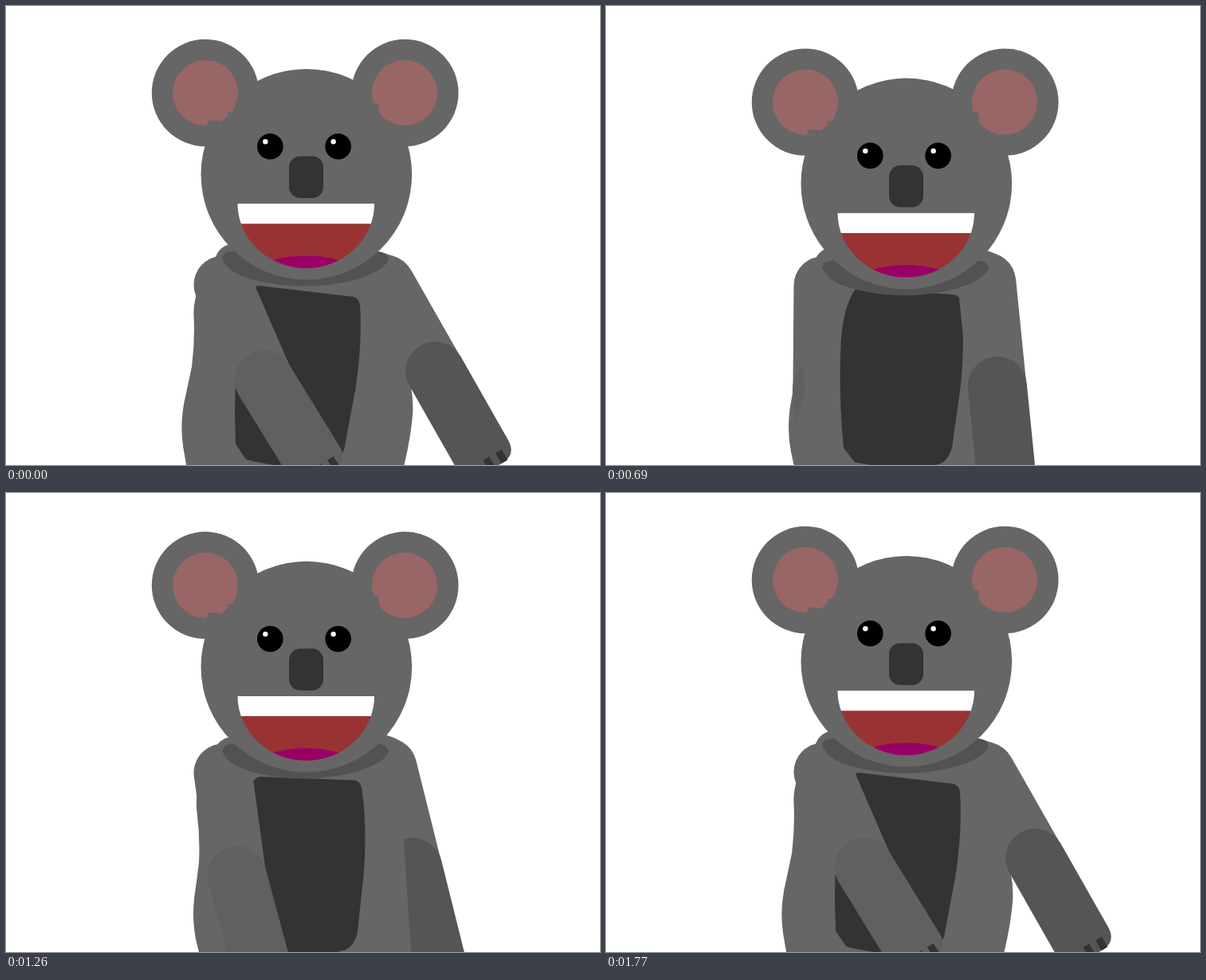
Animation, 745 px wide and 576 px high, one loop 1800 ms. Source, as an HTML page:

```html
<!DOCTYPE html>
<html lang="en">
<head>
<meta charset="utf-8">
<title>Dancing koala</title>
<style>
html, body { margin: 0; width: 100%; height: 100%; overflow: hidden; background: #fff; }
svg { display: block; }
.fur { fill: #666; }
.dark { fill: #333; }
.pink { fill: #966; }
.upper { stroke: #666; stroke-width: 73; stroke-linecap: round; }
</style>
</head>
<body>
<svg width="745" height="576" viewBox="0 0 745 576">
  <defs>
    <clipPath id="mouth"><path d="M290.500 248H462A85.750 81 0 0 1 290.500 248Z"/></clipPath>
    <path id="claws" class="dark" d="M-24 127h9v15h-9zM-3 127h9v15h-9zM15 127h9v15h-9z"/>
    <path id="forearm" d="M-37 0A37 37 0 0 1 37 0V120Q37 142 16 142H-16Q-37 142 -37 120Z"/>
    <g id="eye">
      <circle r="16.300"/>
      <circle cx="-6" cy="-6" r="3.200" fill="#fff"/>
    </g>
  </defs>
  <g class="body fur">
    <path d="M262 318Q266 303 280 299L465 308Q503 315 510 340Q516 375 509 410Q505 445 506 469Q511 490 510 511Q507 550 493 600H230L222 553Q217 520 226 485L233 452Q237 420 235.500 390Q234 370 245 345Z"/>
  </g>
  <g id="back"></g>
  <g class="body">
    <path class="fur" d="M243 380V478Q230 510 229 530L232 600H489L492 380Z"/>
    <path class="dark" d="M318 351L436 365Q443 367 444 376Q447 425 438 482L424 556Q419 572 408 576L384 581Q330 577 301 569L288 550Q285 490 290 430Q293 385 307 360Q311 351 318 351Z"/>
  </g>
  <g id="front">
    <g id="left">
      <line class="upper"/>
      <g class="fore"><use href="#forearm" fill="#606060"/><use href="#claws"/></g>
    </g>
    <g id="right">
      <line class="upper"/>
      <g class="fore"><use href="#forearm" fill="#555"/><use href="#claws"/></g>
    </g>
  </g>
  <g id="head">
    <path fill="#525252" d="M271 316Q274 308 284 308H467Q478 309 480 317Q476 332 440 343Q376 360 312 344Q276 335 271 316Z"/>
    <g class="fur">
      <circle cx="250" cy="109" r="67.200"/>
      <circle cx="500.300" cy="109" r="67.200"/>
      <circle cx="376.800" cy="211.300" r="132.300"/>
      <circle class="pink" cx="250" cy="109" r="41"/>
      <circle class="pink" cx="500" cy="109" r="41"/>
      <path d="M293 116L288 121V130L286 133H278V138L270 145L254 143L251 152H275L293 135Z"/>
      <path d="M456 122H467L469 138H456Z"/>
    </g>
    <use href="#eye" x="331.300" y="176.300"/>
    <use href="#eye" x="416.600" y="176.300"/>
    <rect class="dark" x="355" y="188.500" width="43" height="52.500" rx="14"/>
    <g clip-path="url(#mouth)">
      <path fill="#fff" d="M290 248h173v26h-173z"/>
      <path fill="#933" d="M290 273.300h173v60h-173z"/>
      <ellipse cx="376.300" cy="331.500" rx="57" ry="18" fill="#906"/>
    </g>
  </g>
</svg>
<script>
const STEP = 30, STEPS = 60, LAST = STEPS - 1;
const SWING = LAST / 3; // three arm swings per loop
const $ = id => document.getElementById(id);

// Triangle wave: 1 at whole numbers, -1 halfway between
const triangle = x => 4 * Math.abs(x - Math.floor(x) - 0.5) - 1;

function poseArm(id, x, y, upperAngle, foreAngle, length, behind) {
  const arm = $(id), r = upperAngle * Math.PI / 180;
  const ex = x + length * Math.sin(r), ey = y + length * Math.cos(r);
  const line = arm.querySelector('.upper');
  Object.entries({ x1: x, y1: y, x2: ex, y2: ey }).forEach(([k, v]) => line.setAttribute(k, v));
  arm.querySelector('.fore').setAttribute('transform', `translate(${ex} ${ey}) rotate(${-foreAngle})`);
  const layer = $(behind ? 'back' : 'front');
  if (arm.parentNode !== layer) layer.append(arm);
}

// Quick eased dip, then a slow steady rise
function headDrop(s) {
  const dip = 1 - Math.max(0, 1 - s / 18) ** 1.6;
  return 11.6 * Math.min(dip, (LAST - s) / 29);
}

function draw(s) {
  const drift = Math.sin(2 * Math.PI * s / LAST);
  const wave = triangle((s + 0.4 + 0.35 * drift) / SWING);
  const angle = 33 * wave - 0.7;
  const lean = 5.5 * wave - 5.1 + 2 * drift;
  const turn = s / SWING;

  document.querySelectorAll('.body').forEach(g => g.setAttribute('transform', `rotate(${lean} 380 345)`));
  // Each arm passes behind the body for one swing, changing sides when stretched out
  poseArm('left', 272, 350 - lean / 4, angle - 6.2, angle * 1.06 + 0.2, 130, turn > 0.5 && turn < 1.5);
  poseArm('right', 476 - 0.6 * lean, 349 + 1.1 * lean, angle, angle, 133 - angle / 4, turn > 2 && turn < 3);
  $('head').setAttribute('transform', `translate(0 ${headDrop(s)})`);
}

const start = performance.now();
function tick() {
  draw(Math.floor((performance.now() - start) / STEP) % STEPS);
  requestAnimationFrame(tick);
}
tick();
</script>
</body>
</html>
```
